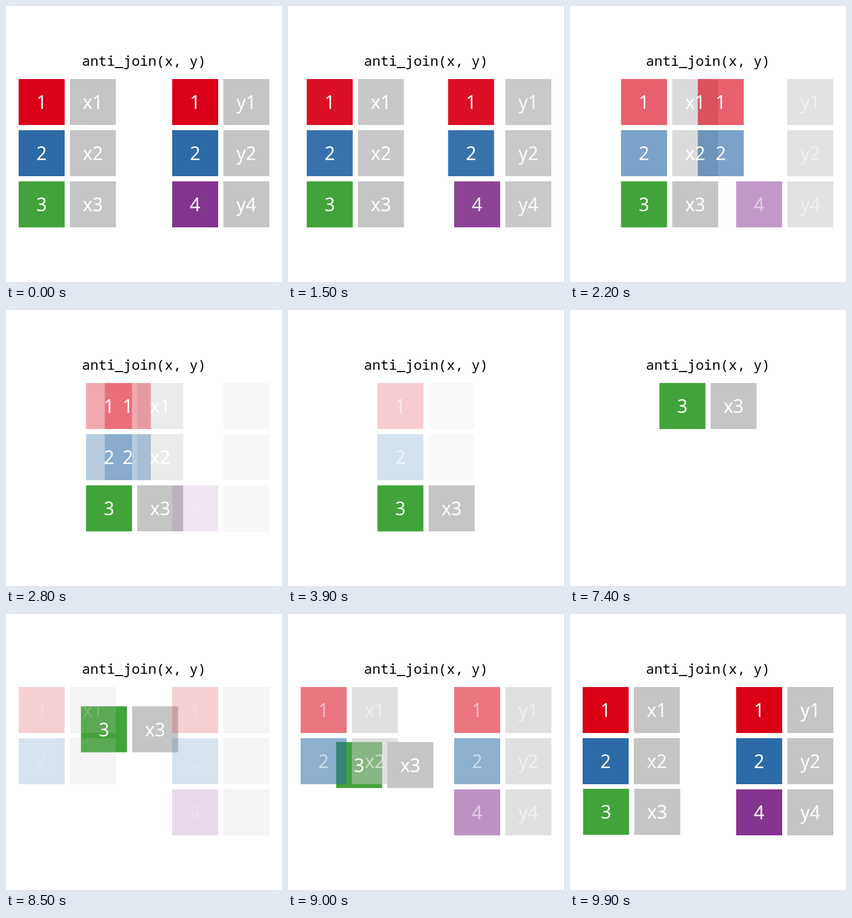
An HTML page for the animation above (10 s loop, 480x480 px).

```html
<!DOCTYPE html>
<html lang="en">
<head>
<meta charset="utf-8">
<title>anti_join(x, y)</title>
<style>
  html, body { margin: 0; width: 100%; height: 100%; overflow: hidden; background: #fff; }
  svg { display: block; width: 100vw; height: 100vh; }
  text { text-anchor: middle; }
  .title { font: 24px "Noto Sans Mono", "DejaVu Sans Mono", monospace; fill: #000; }
  .label { font: 32px "Noto Sans", "Open Sans", sans-serif; fill: #fff; }
</style>
</head>
<body>
<svg viewBox="0 0 480 480">
  <text class="title" x="240" y="104">anti_join(x, y)</text>
  <g id="tiles"></g>
  <g id="labels"></g>
</svg>
<script>
const LOOP = 10000, STEP = 100;
const SIZE = 80, PITCH = 89, TOP = 127;
const LEFT = { x: 22, y: 289 }, CENTER = 155.5;
const COLORS = { 1: '#da0017', 2: '#2c6aa8', 3: '#41a339', 4: '#84358f' };
const GRAY = '#c5c5c5', DIMMED = 0.25;

const add = (parent, tag, attrs) => {
  const el = document.createElementNS('http://www.w3.org/2000/svg', tag);
  for (const name in attrs) el.setAttribute(name, attrs[name]);
  return document.getElementById(parent).appendChild(el);
};

function makeCell(table, id, row, isKey) {
  const label = add('labels', 'text', { class: 'label', x: SIZE / 2, y: 52 });
  label.textContent = isKey ? id : table + id;
  return {
    tile: add('tiles', 'rect', { width: SIZE, height: SIZE, fill: isKey ? COLORS[id] : GRAY }),
    label,
    x: LEFT[table] + (isKey ? 0 : PITCH),
    y: TOP + row * PITCH,
    shift: CENTER - LEFT[table],
    kept: id === 3,
    matched: id < 3 && (table === 'x' || isKey)
  };
}

// The kept row comes first, so the others are painted over it.
const rows = [['x', 3, 2], ['x', 1, 0], ['x', 2, 1], ['y', 1, 0], ['y', 2, 1], ['y', 4, 2]];
const cells = rows.flatMap(row => [makeCell(...row, true), makeCell(...row, false)]);

// Sine in-out progress between two times
const ease = (t, from, to) => {
  const p = Math.min(1, Math.max(0, (t - from) / (to - from)));
  return (1 - Math.cos(Math.PI * p)) / 2;
};

function place(cell, x, y, tileAlpha, labelAlpha) {
  for (const el of [cell.tile, cell.label]) el.setAttribute('transform', `translate(${x} ${y})`);
  cell.tile.setAttribute('opacity', tileAlpha);
  cell.label.setAttribute('opacity', labelAlpha);
}

function draw(t) {
  const merge = ease(t, 1100, 3300);
  const drop = ease(t, 3300, 4400);
  const rise = ease(t, 4500, 6700);
  const reset = ease(t, 7900, LOOP);

  for (const cell of cells) {
    const { x, y, shift } = cell;
    if (cell.kept) {
      place(cell, x + shift * (merge - reset), y - 2 * PITCH * (rise - reset), 1, 1);
    } else if (reset > 0) {
      place(cell, x, y, reset, reset);
    } else if (cell.matched) {
      const left = 1 - drop;
      place(cell, x + shift * merge, y, (1 - (1 - DIMMED) * merge) * left, left);
    } else {
      place(cell, x, y, 1 - merge, 1 - merge);
    }
  }
}

let start;
function tick(now) {
  start ??= now;
  draw(Math.floor(((now - start) % LOOP) / STEP) * STEP);
  requestAnimationFrame(tick);
}
draw(0);
requestAnimationFrame(tick);
</script>
</body>
</html>
```
